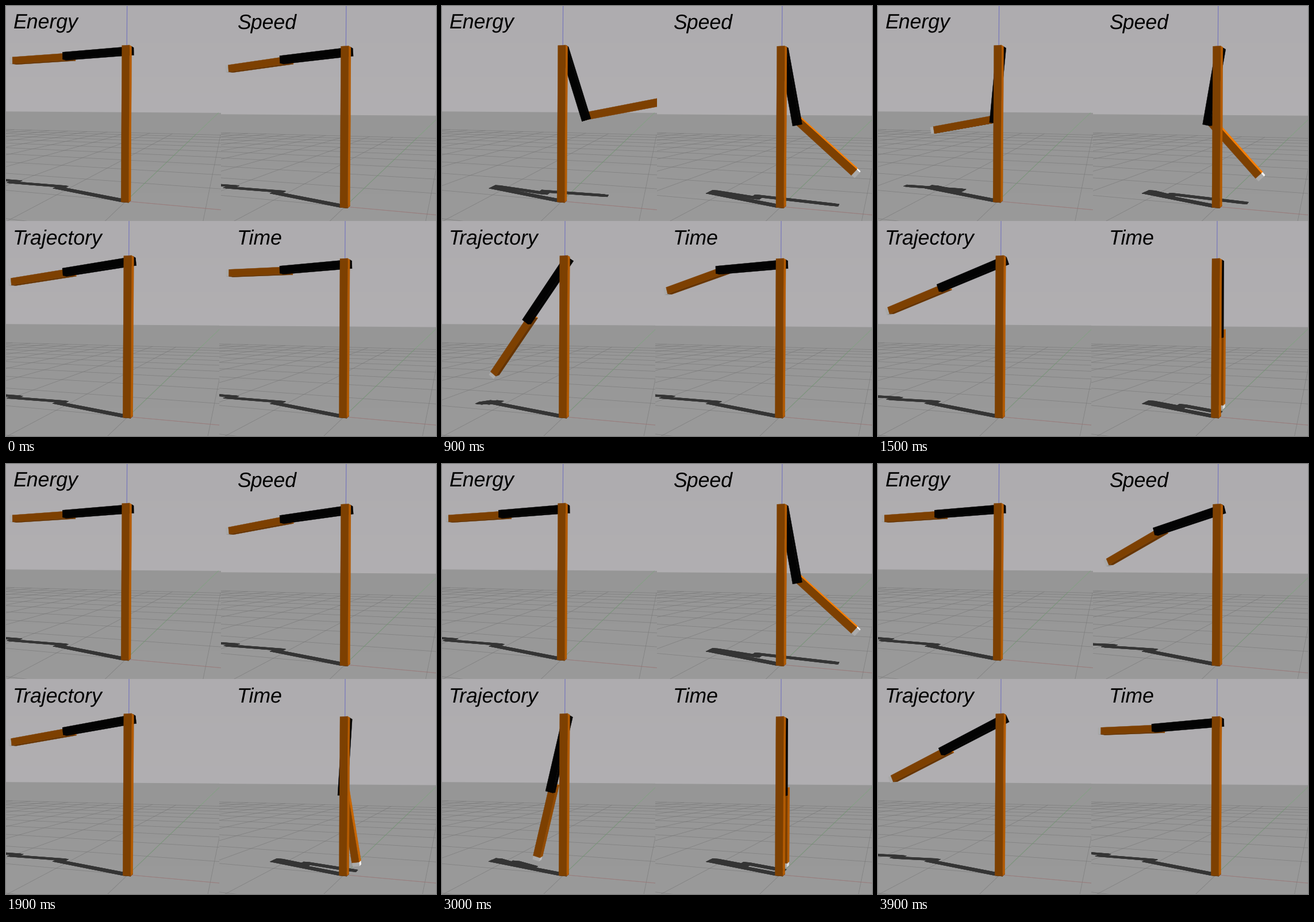
These frames come from a looping animation (748x748 px, 4000 ms). A matplotlib script:

```python
import numpy as np
import matplotlib.pyplot as plt
from matplotlib.animation import FuncAnimation
from matplotlib.collections import PolyCollection
from matplotlib.patches import Polygon, Rectangle

SIZE, DPI, FRAMES = 748, 100, 40
PX = 72 / DPI
plt.rcParams["text.hinting"] = "no_hinting"

# Camera: distance to the post, height and yaw
DIST, EYE, YAW = 4.19, 1.2375, np.radians(17.1)
COS, SIN = np.cos(YAW), np.sin(YAW)
CAMERA = np.array([DIST * SIN, -DIST * COS, EYE])
SUN = np.array([0.53, -0.157, 0.9])
SUN_DIR = SUN / np.linalg.norm(SUN)

# Base grey level or colour, ambient share, diffuse share
ORANGE = (np.array([1, 0.51, 0.012]), 0.40, 0.60)
BLACK = (np.full(3, 0.025), 0.5, 0.3)
WHITE = (np.full(3, 0.94), 0.62, 0.60)
SHADOW = (0.205, 0.205, 0.205)


def ramp(k, start, end):
    """Cosine ease from 0 to 1."""
    u = np.clip((k - start) / (end - start), 0, 1)
    return (1 - np.cos(np.pi * u)) / 2


def swing(out, out_span, rest, back_span):
    """Angle that swings out to one side, then back up to its rest."""
    return lambda k: (out * ramp(k, *out_span)
                      + (rest - out) * ramp(k, *back_span))


def box(joint, angle, start, end, half):
    """Centre, axes and half sizes of a bar leaving a joint at an angle."""
    sa, ca = np.sin(angle), np.cos(angle)
    axes = np.array([[sa, 0, -ca], [ca, 0, sa], [0, 1, 0]])
    centre = np.array(joint) + axes[0] * (start + end) / 2
    return centre, axes, np.array([(end - start) / 2, half, half])


def faces(bar):
    """Yield centre, normal and corners of the six sides."""
    centre, axes, half = bar
    for i in range(3):
        p, q = [axes[j] * half[j] for j in range(3) if j != i]
        for sign in (-1, 1):
            normal = sign * axes[i]
            mid = centre + normal * half[i]
            yield mid, normal, np.array([mid + p + q, mid + p - q,
                                         mid - p - q, mid - p + q])


def ground_shadow(points):
    return points - points[:, 2:] * SUN / SUN[2]


class Panel:
    def __init__(self, ax, rect, base, scale, label, period, upper, lower):
        self.base, self.scale, self.period = base, scale, period
        self.upper, self.lower = upper, lower
        self.horizon = base[1] - scale * EYE
        x0, y0, x1, y1 = rect
        self.clip = Rectangle((x0, y0), x1 - x0, y1 - y0,
                              transform=ax.transData)
        self.post = box((0, 0, 0), np.pi, 0, 2, 0.05)

        self.gradient(ax, rect, (174, 172, 175), (180, 178, 180))
        edge = self.project(np.array([[-49, 50, 0], [12, 50, 0]]))
        shape = Polygon(np.vstack([edge, [(x1 + 90, y1), (x0 - 90, y1)]]),
                        transform=ax.transData)
        floor = self.gradient(ax, (x0, edge[:, 1].min(), x1, y1),
                              (150, 150, 150), (154, 154, 154))
        floor.set_clip_path(shape)

        self.grid(ax)
        self.polys = PolyCollection([], linewidths=0.3, zorder=3)
        ax.add_collection(self.polys, autolim=False)
        self.polys.set_clip_path(self.clip)
        ax.text(*label[1:], label[0], family="Liberation Sans",
                style="italic", size=35.6 * PX, color="black",
                va="baseline", zorder=4)

    def gradient(self, ax, rect, top, bottom):
        x0, y0, x1, y1 = rect
        mix = np.linspace(0, 1, 64)[:, None, None]
        rows = (1 - mix) * np.array(top) + mix * np.array(bottom)
        return ax.imshow(rows / 255, extent=(x0, x1, y1, y0), aspect="auto",
                         interpolation="nearest", zorder=0)

    def project(self, points):
        x, y, z = np.asarray(points, float).T
        depth = DIST - SIN * x + COS * y
        depth = np.where(depth > 0.4, depth, np.nan)
        f = self.scale * DIST / depth
        sy = self.horizon - f * (z - EYE)
        sx = self.base[0] + f * (COS * x + SIN * y)
        return np.column_stack([sx + 0.006 * (self.base[1] - sy), sy])

    def line(self, ax, start, end, color, width, alpha):
        t = np.linspace(0, 1, 300)[:, None]
        pts = self.project(np.array(start) * (1 - t) + np.array(end) * t)
        path, = ax.plot(*pts.T, color=color, lw=width * PX, alpha=alpha,
                        zorder=1)
        path.set_clip_path(self.clip)

    def grid(self, ax):
        for i in range(-10, 11):
            for a, b in (((i, -10, 0), (i, 10, 0)), ((-10, i, 0), (10, i, 0))):
                self.line(ax, a, b, "#757575", 0.8, 0.65)
        self.line(ax, (0, 0, 0), (6, 0, 0), "#b07474", 1, 0.5)
        self.line(ax, (0, 0, 0), (0, 50, 0), "#74aa74", 1, 0.5)
        self.line(ax, (0, 0, 1.9), (0, 0, 3.5), "#7474bc", 1.3, 0.9)

    def draw(self, frame):
        k = (frame - 1) % self.period
        upper, lower = np.radians([self.upper(k), self.lower(k)])
        elbow = (0.9 * np.sin(upper), 0.2, 1.95 - 0.9 * np.cos(upper))
        bars = [
            (box(elbow, lower, 0.94, 0.99, 0.046), WHITE),
            (box(elbow, lower, -0.05, 0.94, 0.05), ORANGE),
            (box((0, 0.1, 1.95), upper, -0.05, 0.95, 0.05), BLACK),
            (self.post, ORANGE),
        ]
        verts, colors = [], []
        for bar, _ in bars:
            for _, _, corners in faces(bar):
                verts.append(self.project(ground_shadow(corners)))
                colors.append(SHADOW)
        for bar, (base, ambient, diffuse) in bars:
            for mid, normal, corners in faces(bar):
                if normal @ (CAMERA - mid) > 0:
                    light = ambient + diffuse * max(0, normal @ SUN_DIR)
                    verts.append(self.project(corners))
                    colors.append(np.clip(base * light, 0, 1))
        self.polys.set_verts(verts)
        self.polys.set_facecolor(colors)
        self.polys.set_edgecolor(colors)
        return self.polys


fig = plt.figure(figsize=(SIZE / DPI, SIZE / DPI), dpi=DPI)
ax = fig.add_axes([0, 0, 1, 1])
ax.axis("off")

# Each run starts hanging, swings up to the left, holds, then restarts
panels = [
    Panel(ax, (0, 0, 374, 374), (208.6, 339.5), 135, ("Energy", 12.5, 40), 40,
          upper=swing(18, (0, 8), -88.4, (12.2, 18)),
          lower=swing(102, (0, 8.5), -89, (8, 15))),
    Panel(ax, (374, 0, 748, 374), (589.7, 349), 139, ("Speed", 403, 40), 21,
          upper=swing(20, (3.5, 12), -86.3, (11.5, 18.5)),
          lower=swing(71, (0.5, 12.5), -85, (12.3, 18.5))),
    Panel(ax, (0, 374, 371, 748), (212, 714.5), 139.5,
          ("Trajectory", 12, 415), 25,
          upper=swing(0, (0, 1), -84, (-1.5, 19.5)),
          lower=swing(0, (0, 1), -84, (-1.5, 19.5))),
    Panel(ax, (371, 374, 748, 748), (588, 714.5), 137, ("Time", 402, 415), 14,
          upper=swing(0, (0, 1), -88, (3.4, 8.1)),
          lower=swing(20, (2, 6), -90.3, (5, 9))),
]
ax.set_xlim(0, SIZE)
ax.set_ylim(SIZE, 0)


def update(frame):
    return [panel.draw(frame) for panel in panels]


anim = FuncAnimation(fig, update, frames=FRAMES, interval=100, repeat=True,
                     repeat_delay=0, blit=False)
plt.show()
```
